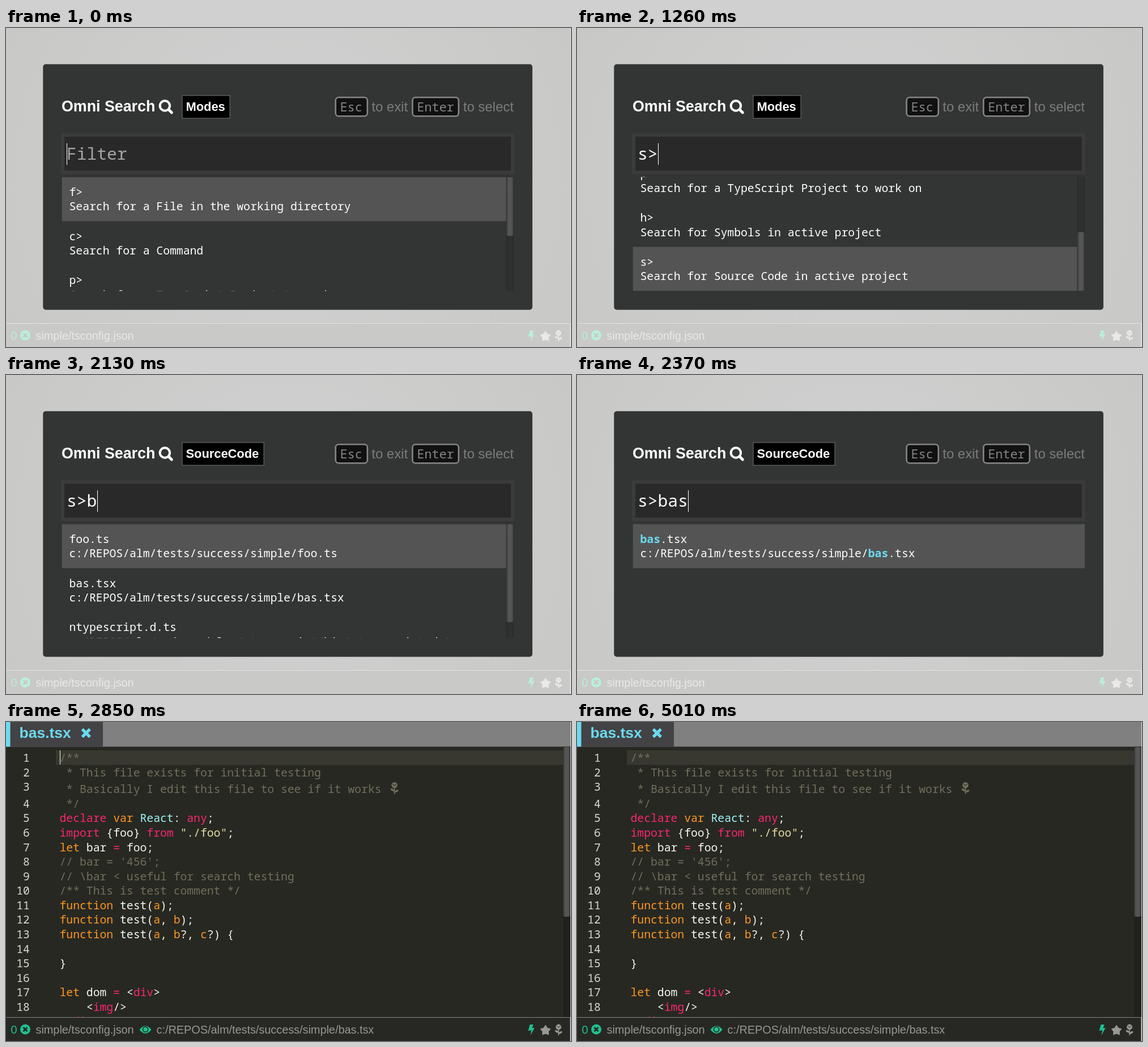
Recreate the animation shown at these times as an HTML page with a canvas. Size 997x562 px, loop 5.19 s.

```html
<!DOCTYPE html>
<html lang="en">
<head>
<meta charset="utf-8">
<title>Omni Search</title>
<style>
html, body { margin: 0; width: 100%; height: 100%; overflow: hidden; background: #c9c9c8; }
canvas { display: block; width: 997px; height: 562px; }
</style>
</head>
<body>
<canvas id="stage" width="997" height="562"></canvas>
<script>
const W = 997, H = 562, LOOP = 5190;
const ctx = document.getElementById('stage').getContext('2d');
const SANS = '"Liberation Sans", Arial, sans-serif';
const MONO = '"Noto Sans Mono", "DejaVu Sans Mono", monospace';
const CODE = 19.73, ROW = 25.6;
const WHITE = '#f8f8f2', CYAN = '#6bdaef';

const LIST = { x: 98.5, y: 262.6, w: 797.5, h: 200.6, item: 77.7 };

const MODES = [
  ['f>', 'Search for a File in the working directory'],
  ['c>', 'Search for a Command'],
  ['p>', 'Search for a TypeScript Project to work on'],
  ['h>', 'Search for Symbols in active project'],
  ['s>', 'Search for Source Code in active project']
];
const FILES = [
  ['foo.ts', 'c:/REPOS/alm/tests/success/simple/foo.ts'],
  ['bas.tsx', 'c:/REPOS/alm/tests/success/simple/bas.tsx'],
  ['ntypescript.d.ts', 'c:/REPOS/alm/node_modules/ntypescript/bin/ntypescript.d.ts']
];

// Each line alternates a colour key and its text.
const INK = { c: '#716e5c', p: '#f92672', o: '#fd971f', s: '#e6dfa4', t: '#9ff3f5', w: WHITE };
const SOURCE = [
  ['c', '/**'],
  ['c', ' * This file exists for initial testing'],
  ['c', ' * Basically I edit this file to see if it works'],
  ['c', ' */'],
  ['p', 'declare ', 'o', 'var ', 't', 'React', 'w', ': ', 'p', 'any', 'w', ';'],
  ['p', 'import ', 'w', '{foo} ', 'p', 'from ', 's', '"./foo"', 'w', ';'],
  ['o', 'let ', 'w', 'bar ', 'p', '= ', 'w', 'foo;'],
  ['c', "// bar = '456';"],
  ['c', '// \\bar < useful for search testing'],
  ['c', '/** This is test comment */'],
  ['o', 'function ', 'w', 'test(', 'o', 'a', 'w', ');'],
  ['o', 'function ', 'w', 'test(', 'o', 'a', 'w', ', ', 'o', 'b', 'w', ');'],
  ['o', 'function ', 'w', 'test(', 'o', 'a', 'w', ', ', 'o', 'b', 'w', '?, ', 'o', 'c', 'w', '?) {'],
  [],
  ['w', '}'],
  [],
  ['o', 'let ', 'w', 'dom ', 'p', '= ', 'w', '<', 'p', 'div', 'w', '>'],
  ['w', '    <', 'p', 'img', 'w', '/>'],
  ['w', '</', 'p', 'div', 'w', '>']
];

// Value of the last [time, value] pair that has begun.
function at(t, steps) {
  let value = steps[0][1];
  for (const [start, v] of steps) if (t >= start) value = v;
  return value;
}

function text(str, x, y, size, color, family = SANS, weight = 400) {
  ctx.font = `${weight} ${size}px ${family}`;
  ctx.fillStyle = color;
  ctx.fillText(str, x, y);
  return x + ctx.measureText(str).width;
}

function rect(x, y, w, h, color) {
  ctx.fillStyle = color;
  ctx.fillRect(x, y, w, h);
}

function panel(x, y, w, h, r, fill) {
  ctx.beginPath();
  ctx.roundRect(x, y, w, h, r);
  ctx.fillStyle = fill;
  ctx.fill();
}

function line(points, color, width, cap = 'butt') {
  ctx.beginPath();
  points.forEach(([x, y]) => ctx.lineTo(x, y));
  ctx.strokeStyle = color;
  ctx.lineWidth = width;
  ctx.lineCap = cap;
  ctx.stroke();
}

function shape(points, color) {
  ctx.beginPath();
  points.forEach(([x, y]) => ctx.lineTo(x, y));
  ctx.fillStyle = color;
  ctx.fill();
}

function disc(x, y, rx, color, ry = rx, angle = 0) {
  ctx.beginPath();
  ctx.ellipse(x, y, rx, ry, angle, 0, Math.PI * 2);
  ctx.fillStyle = color;
  ctx.fill();
}

function cross(x, y, r, color, width) {
  line([[x - r, y - r], [x + r, y + r]], color, width);
  line([[x + r, y - r], [x - r, y + r]], color, width);
}

function clipped(x, y, w, h, draw) {
  ctx.save();
  ctx.beginPath();
  ctx.rect(x, y, w, h);
  ctx.clip();
  draw();
  ctx.restore();
}

function magnifier(x, y) {
  line([[x + 7, y + 7], [x + 12, y + 12]], '#fff', 4.8, 'round');
  ctx.beginPath();
  ctx.arc(x, y, 8.7, 0, Math.PI * 2);
  ctx.strokeStyle = '#fff';
  ctx.lineWidth = 4;
  ctx.stroke();
}

function bolt(x, y, color) {
  shape([[x + 3, y], [x + 9, y], [x + 7, y + 6], [x + 11, y + 6],
    [x + 4, y + 19], [x + 5.5, y + 10], [x, y + 11]], color);
}

function star(x, y, r, color) {
  const points = [];
  for (let i = 0; i < 10; i++) {
    const a = i * Math.PI / 5 - Math.PI / 2, d = i % 2 ? r * 0.6 : r;
    points.push([x + d * Math.cos(a), y + d * Math.sin(a)]);
  }
  shape(points, color);
}

function rose(x, y, k, color, gap) {
  ctx.save();
  ctx.translate(x, y);
  ctx.scale(k, k);
  line([[0, 8], [0, 20]], color, 1.7);
  disc(0, 5, 5, color);
  line([[-3, 3], [0, 6], [3, 3]], gap, 1);
  disc(-3.3, 13, 3.6, color, 1.7, 0.5);
  disc(3.3, 15, 3.6, color, 1.7, -0.5);
  ctx.restore();
}

function eye(x, y, color, bg) {
  ctx.beginPath();
  ctx.moveTo(x - 10.5, y);
  ctx.quadraticCurveTo(x, y - 13.5, x + 10.5, y);
  ctx.quadraticCurveTo(x, y + 13.5, x - 10.5, y);
  ctx.fillStyle = color;
  ctx.fill();
  ctx.beginPath();
  ctx.arc(x, y - 0.5, 4.6, 0, Math.PI * 2);
  ctx.strokeStyle = bg;
  ctx.lineWidth = 1.6;
  ctx.stroke();
}

function statusBar(bg, edge, ink, accent, path) {
  rect(0, 520, W - 1, 42, bg);
  rect(0, 520, W - 1, 1, edge);
  rect(995, 520, 1, 42, edge);
  text('0', 8.5, 549, 19.85, accent);
  disc(34, 541.5, 9, accent);
  cross(34, 541.5, 3.5, bg, 2.8);
  text('simple/tsconfig.json', 52.5, 549, 19.85, ink);
  if (path) {
    eye(246, 542, accent, bg);
    text(path, 265.5, 549, 19.85, ink);
  }
  bolt(921.5, 533, accent);
  star(952, 543.5, 10, ink);
  rose(975, 532.5, 0.98, ink, bg);
}

function thumb(x, y, w, h) {
  const g = ctx.createLinearGradient(x, 0, x + w, 0);
  g.addColorStop(0, '#3d3e3d');
  g.addColorStop(0.3, '#555');
  g.addColorStop(0.7, '#555');
  g.addColorStop(1, '#3d3e3d');
  panel(x, y, w, h, 3, g);
}

function marked(str, x, y, hit) {
  const parts = hit ? str.split(hit) : [str];
  parts.forEach((part, i) => {
    if (i) x = text(hit, x, y, CODE, CYAN, MONO, 700);
    x = text(part, x, y, CODE, '#fff', MONO, 500);
  });
}

function results(t) {
  const hit = at(t, [[0, ''], [2160, 'b'], [2280, 'ba'], [2370, 'bas']]);
  const items = t < 1350 ? MODES : FILES.filter(f => f[1].includes(hit));
  const selected = at(t, [[0, 0], [720, 4], [1350, 0]]);
  const total = items.length * LIST.item;
  const room = Math.max(0, total - LIST.h);
  const scroll = at(t, [[0, 0], [750, room], [1380, 0]]);
  const width = room ? LIST.w - 13.3 : LIST.w;

  clipped(LIST.x, LIST.y, LIST.w, LIST.h, () => {
    items.forEach(([name, info], i) => {
      const y = LIST.y + i * LIST.item - scroll;
      if (i === selected) rect(LIST.x, y, width, LIST.item, '#545454');
      marked(name, 111.5, y + 33.2, hit);
      marked(info, 111.5, y + 33.2 + ROW, hit);
    });
    if (room) {
      const x = LIST.x + width;
      rect(x, LIST.y, 13.3, LIST.h, '#2a2c2b');
      rect(x + 2, LIST.y, 9.3, LIST.h, '#2f3130');
      thumb(x + 0.5, LIST.y + scroll * LIST.h / total, 12.3, LIST.h * LIST.h / total);
    }
  });
}

function key(label, x, w) {
  panel(x, 121, w, 35.5, 6.5, '#868686');
  panel(x + 2.6, 123.6, w - 5.2, 30.3, 4, '#111');
  text(label, x + 9.2, 147, 21.8, '#868686', MONO);
}

function search(t) {
  const bg = ctx.createRadialGradient(498, 270, 0, 498, 270, 570);
  bg.addColorStop(0, '#d2d2d3');
  bg.addColorStop(1, '#c8c8c6');
  rect(0, 0, W, H, bg);

  if (t >= 2580) {
    ctx.globalAlpha = Math.min(1, (t - 2550) / 240);
    text('E', 47.5, 293, 49, '#b8f0dd', SANS, 700);
    ctx.globalAlpha = 1;
  }
  statusBar('#c9c9c7', '#e3e3e2', '#e9e9e8', '#b8f0dd');

  panel(65.3, 63.7, 863.6, 432.8, 5, '#333534');
  text('Omni Search', 98, 147, 26.8, '#fff', SANS, 700);
  magnifier(280.3, 137);

  const mode = t < 1350 ? 'Modes' : 'SourceCode';
  const w = t < 1350 ? 85 : 145;
  rect(310.5, 118.5, w, 41, '#777');
  rect(311.5, 119.5, w - 2, 39, '#000');
  text(mode, 317.5, 146.3, 21.85, '#fff', SANS, 700);

  key('Esc', 580.3, 58.7);
  text('to exit', 645.3, 147, 23.9, '#7b7c7b');
  key('Enter', 716, 84);
  text('to select', 806.8, 147, 23.9, '#7b7c7b');

  rect(97, 185.5, 800, 72, '#3a3b3a');
  rect(103, 191.5, 788, 59.8, '#292929');
  const query = at(t, [[0, ''], [1260, 's>'], [2130, 's>b'], [2250, 's>ba'], [2340, 's>bas']]);
  text(query || 'Filter', 107, 232, 29.6, query ? '#fff' : '#a5a5a5', MONO);
  const caret = at(t, [[0, 1], [480, 0], [900, 1], [1830, 0], [2130, 1]]);
  if (caret) rect(Math.round(107.4 + query.length * 17.76), 203, 1, 38, '#fff');

  results(t);
}

function editor(t) {
  const bg = '#272822';
  rect(0, 0, W, H, bg);
  rect(0, 0, W, 43.5, '#808080');
  rect(0, 0, 171, 43.5, '#434244');
  rect(0, 0, 7.5, 43.5, CYAN);
  text('bas.tsx', 23.5, 28, 26.5, CYAN, SANS, 700);
  cross(141.3, 19.5, 6.8, CYAN, 5.2);

  rect(88, 50, 895, 25.5, '#383831');
  clipped(0, 44, W, 476, () => {
    SOURCE.forEach((parts, i) => {
      const y = i < 3 ? 70 + i * ROW : 150.8 + (i - 3) * 25.57;
      ctx.textAlign = 'right';
      text(String(i + 1), 41.8, y, CODE, '#dadad4', MONO, 500);
      ctx.textAlign = 'left';
      let x = 94.5;
      for (let j = 0; j < parts.length; j += 2) {
        const weight = parts[j] === 'c' ? 400 : 500;
        x = text(parts[j + 1], x, y + (i === 2 ? 3.6 : 0), CODE, INK[parts[j]], MONO, weight);
      }
    });
    rose(685.5, 106, 1.05, INK.c, bg);
  });

  const caret = at(t, [[2850, 1], [3330, 0], [3690, 1], [4110, 0], [4530, 1], [5010, 0]]);
  if (caret) rect(95, 50, 1, 25, WHITE);

  rect(983, 43.5, 13, 476.5, '#20211d');
  thumb(983.3, 44, 12.4, 299);
  statusBar('#272823', '#82837f', '#979894', '#1fc08f', 'c:/REPOS/alm/tests/success/simple/bas.tsx');
}

function frame() {
  const t = Math.floor((performance.now() % LOOP) / 30) * 30;
  if (t < 2850) search(t);
  else editor(t);
  rect(W - 1, 0, 1, H, '#dcdcdc');
  requestAnimationFrame(frame);
}
frame();
</script>
</body>
</html>
```
